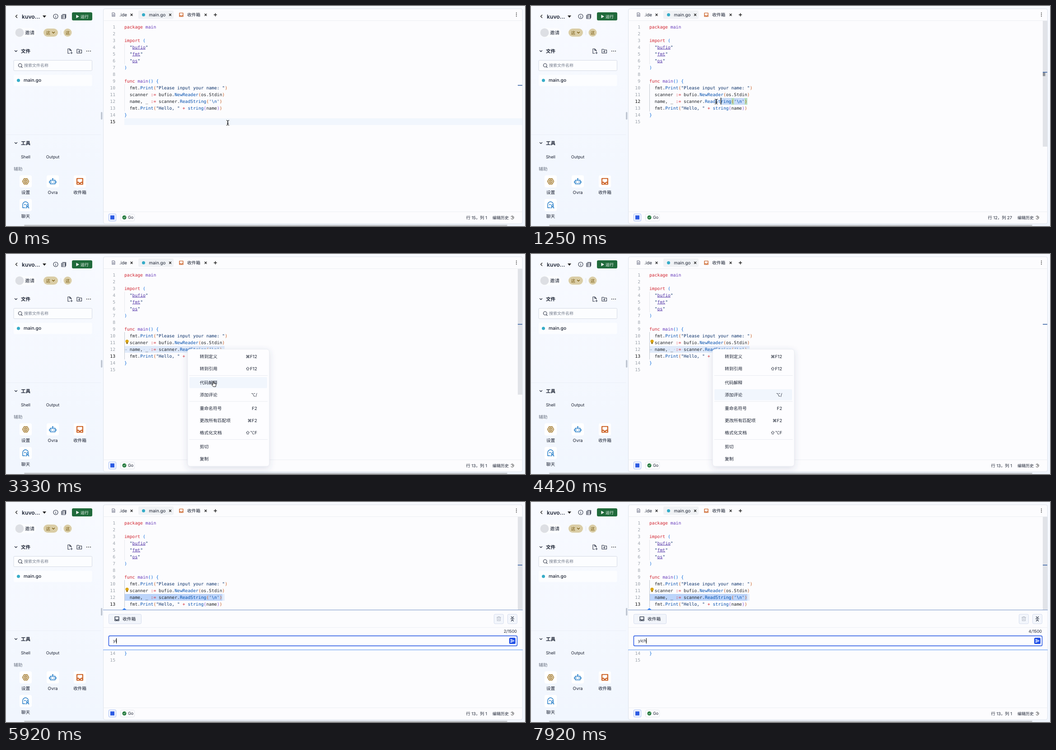
Write an HTML page that moves like this. It is 1149 px wide and 488 px high and loops after 8000 ms.

```html
<!DOCTYPE html>
<html lang="zh">
<head>
<meta charset="utf-8">
<title>Code editor</title>
<style>
  html, body { margin: 0; width: 100%; height: 100%; overflow: hidden; background: #f6f9fe; }
  svg { display: block; width: 1149px; height: 488px; }
  text { font: 9.75px Inter, "Noto Sans CJK SC", "Noto Sans CJK", "DejaVu Sans", sans-serif; fill: #1c2333;
         white-space: pre; text-rendering: geometricPrecision; }
  .code { font: 9.73px "DejaVu Sans Mono", monospace; fill: #1f2328; }
  .num { font: 9.73px "DejaVu Sans Mono", monospace; fill: #9ba2ab; text-anchor: end; }
  .num.on { fill: #111; }
  .red { fill: #d1242f; } .purple { fill: #6639ba; } .blue { fill: #0550ae; } .navy { fill: #0a3069; }
  .level1 { fill: #0969da; } .level2 { fill: #c4571a; } .level3 { fill: #8250df; }
  .link { fill: #5437a8; text-decoration: underline; text-underline-offset: 2px; }
  .space { fill: #a9b7cb; }
  .mid { text-anchor: middle; } .end { text-anchor: end; }
  .line { fill: none; stroke: #2a3142; stroke-width: 1.1; stroke-linecap: round; stroke-linejoin: round; }
</style>
</head>
<body>
<svg id="stage" viewBox="0 0 1149 488"></svg>
<script>
const CHAR = 5.86, LEFT = 262, ROW = 15, INDENT = LEFT + 2 * CHAR, PANEL_SHIFT = 94;
const rowY = n => 46 + ROW * (n - 1);
const colX = col => col < 2 ? LEFT : INDENT + (col - 2) * CHAR;

// Markup helpers
const text = (x, y, s, cls = '', extra = '') => `<text x="${x}" y="${y}" class="${cls}" ${extra}>${s}</text>`;
const box = (x, y, w, h, fill, r = 0, extra = '') =>
  `<rect x="${x}" y="${y}" width="${w}" height="${h}" rx="${r}" fill="${fill}" ${extra}/>`;
const line = (d, color = '#2a3142', width = 1.1, extra = '') =>
  `<path class="line" d="${d}" style="stroke:${color};stroke-width:${width}" ${extra}/>`;
const dot = (x, y, r, fill) => `<circle cx="${x}" cy="${y}" r="${r}" fill="${fill}"/>`;
const group = (id, content) => `<g id="${id}">${content}</g>`;
const cross = (x, y) => line(`M${x - 2} ${y - 2}l4 4m0-4l-4 4`, '#222', 1.3);
const chevron = (x, y, color) => line(`M${x - 2.5} ${y - 1.2}l2.5 2.5 2.5-2.5`, color, 1.3);
const tray = (x, y, color, s = 1) =>
  line('M-4-4h8v8h-8zM-4 1.3h2.3l.8 1.2h1.8l.8-1.2H4', color, 1.2, `transform="translate(${x} ${y}) scale(${s})"`);
const span = cls => s => `<tspan class="${cls}">${s}</tspan>`;
const [red, purple, blue, navy, link, b1, b2, b3] =
  ['red', 'purple', 'blue', 'navy', 'link', 'level1', 'level2', 'level3'].map(span);

const importLine = name => '\t' + navy('"') + link(name) + navy('"');
const code = [
  red('package') + ' ' + purple('main'), '',
  red('import') + ' ' + b1('('), importLine('bufio'), importLine('fmt'), importLine('os'), b1(')'), '',
  red('func') + ' ' + purple('main') + b1('()') + ' ' + b1('{'),
  '\tfmt.' + blue('Print') + b2('(') + navy('"Please input your name: "') + b2(')'),
  '\tscanner ' + red(':=') + ' bufio.' + blue('NewReader') + b2('(') + 'os.Stdin' + b2(')'),
  '\tname, _ ' + red(':=') + ' scanner.' + blue('ReadString') + b2('(') + navy("'" + blue('\\n') + "'") + b2(')'),
  '\tfmt.' + blue('Print') + b2('(') + navy('"Hello, "') + ' ' + red('+') + ' ' + blue('string') + b3('(') + 'name' + b3(')') + b2(')'),
  b1('}'), ''
];
const codeRow = (s, i) =>
  text(242, rowY(i + 1) + 3.5, i + 1, 'num', `id="num${i + 1}"`) +
  text(s[0] === '\t' ? INDENT : LEFT, rowY(i + 1) + 3.5, s.trim(), 'code');

const header = (y, s) => chevron(22, y) + text(33, y + 4, s, '', 'style="font-size:10.6px;font-weight:600"');
const tool = (x, y, label, icon) => box(x - 13.5, y - 13.5, 27, 27, '#fff', 4) +
  `<g transform="translate(${x} ${y})">${icon}</g>` + text(x, y + 28, label, 'mid');

const sidebar =
  line('M24.5 20l-3 3 3 3', '#222', 1.4) + text(35, 27.5, 'kuvo...', '', 'style="font-size:12.2px;font-weight:600"') +
  '<path d="M81 21h8l-4 5z" fill="#222"/>' +
  line('M115 23a5 5 0 1 1-10 0a5 5 0 1 1 10 0M110 22.5v3M110 20.5v.1') +
  line('M125 18.5h7.5v7.5M123 20.5h8.5v7.5h-8.5zM123 24.2h8.5M125 22.4h1M125 26.1h1') +
  box(146, 14, 45, 18, '#206a3b', 3) + '<path d="M155.5 19.5v7.5l6.5-3.75z" fill="#fff"/>' +
  text(165, 26.8, '运行', '', 'style="fill:#fff;font-size:9px"') +
  box(20, 48.5, 47, 21, '#fcfdff', 10.5) + dot(30, 59, 9.5, '#dddfe4') +
  text(42, 63, '邀请', '', 'style="font-size:10.6px"') +
  box(83, 50, 32, 18, '#dacda6', 9) + text(88.5, 62.6, '这', '', 'style="fill:#75570d;font-size:9.5px"') +
  chevron(105, 59, '#75570d') + line('M121.5 54v10', '#e0e4ec', 1) +
  dot(136.5, 59, 9, '#dacda6') + text(136.5, 62.6, '这', 'mid', 'style="fill:#75570d;font-size:9.5px"') +
  header(100, '文件') +
  line('M141 95h-4v10h4M141 95l3.5 3.5v2M141 95v3.5h3.5M145 102v4M143 104h4') +
  line('M157 96h4l1 1.5h5.5v7h-10.5zM162.2 99v4M160.2 101h4') +
  [179, 183, 187].map(x => dot(x, 100, 0.9, '#222')).join('') +
  box(17, 120.5, 173.5, 23, '#fcfdff', 2, 'stroke="#d5dbe5"') +
  line('M35 131.5a3.8 3.8 0 1 1-7.6 0a3.8 3.8 0 1 1 7.6 0M34 134.5l2 2') +
  text(40, 135.3, '搜索文件名称', '', 'style="fill:#747c8b;font-size:9px"') +
  box(17, 152.5, 173.5, 25, '#fcfdff', 3) + dot(27.5, 165, 3.5, '#35acc8') +
  text(39, 168.3, 'main.go', '', 'style="font-size:10.2px;font-weight:500"') +
  line('M0 285.5h210', '#eaeff7', 1) + box(210, 235, 3.4, 17, '#bfc6d2', 1.7) +
  header(304, '工具') + text(43.5, 338, 'Shell', 'mid', 'style="font-size:9.2px"') +
  text(103.5, 338, 'Output', 'mid', 'style="font-size:9.2px"') +
  text(17, 364.8, '辅助', '', 'style="fill:#6c7483"') +
  tool(43.5, 389, '设置', line('M-7 0l3.5-6h7l3.5 6-3.5 6h-7zM-3.8 0l1.9-3.3h3.8l1.9 3.3-1.9 3.3h-3.8z', '#95650b', 1.4) + dot(0, 0, 1.4, '#95650b')) +
  tool(103.5, 389, 'Ovra', line('M-5.5-2.5h11v8h-11zM0-2.5v-3M-1-6h2M-7.5 0v3M7.5 0v3M-2.4 1v1M2.4 1v1', '#1976c5', 1.4)) +
  tool(163.5, 389, '收件箱', tray(0, 0, '#c64f0b', 1.6)) +
  tool(43.5, 441.5, '聊天', line('M-1.5 6h-5v-6.500a6.200 6.200 0 0 1 12.400-1M-3-1h3M1 7q0-3 3-3t3 3M6 1.500a2 2 0 1 1-4 0a2 2 0 1 1 4 0', '#1976c5', 1.4));

const tabs =
  box(293, 10, 78, 18.500, '#f0f2f5', 3) + line('M235 15h4l2 2v6h-6zM236.500 19h3M236.500 21h3', '#6c7085') +
  text(251, 22.7, '.ide') + cross(278, 19.5) + dot(304.5, 19.500, 3.500, '#35acc8') +
  text(316.500, 22.7, 'main.go') + cross(363.500, 19.5) + tray(388, 19.5, '#c64f0b') +
  text(401, 23, '收件箱') + cross(442, 19.5) + line('M460.500 19.500h6M463.500 16.500v6', '#222', 1.5) +
  [15.5, 19, 22.5].map(y => dot(1130, y, 0.9, '#222')).join('') + line('M216 32.500h927', '#eceff3', 1);

const statusBar = line('M216 456.500h927', '#eceff3', 1) +
  box(227.5, 461, 16, 16, '#f1f5ff', 2, 'stroke="#a9bff5"') + box(231, 464.5, 9, 9, '#2d5be3') +
  box(253.500, 461.500, 31, 15.500, '#fcfcfe', 3, 'stroke="#e4e7ed"') + dot(262, 469, 4.5, '#247a3d') +
  line('M260 469l1.500 1.500 2.500-3', '#fff', 1) + text(270, 472.4, 'Go', '', 'style="font-size:9px"') +
  text(1065, 472.6, '', 'end', 'id="position" style="font-size:9.3px"') +
  text(1077, 472.6, '编辑历史', '', 'style="font-size:9px"') +
  line('M1118 467a3.500 3.500 0 1 1 0 4.500M1121 467.500v2h1.500', '#333', 1);

const menuItems = [[227, '转到定义', '⌘F12'], [254, '转到引用', '⇧F12'], [285, '代码解释', ''], [312, '添加评论', '⌥/'],
  [342, '重命名符号', 'F2'], [369, '更改所有匹配项', '⌘F2'], [396, '格式化文档', '⇧⌥F'], [427, '剪切', ''], [454, '复制', '']];
const menu = box(402, 211, 181, 260, '#fdfdff', 6, 'stroke="#e6e9ef" filter="url(#shadow)"') +
  box(406, 0, 172, 24.500, '#f1f6fd', 2, 'id="hover"') +
  [269.5, 327, 411.5].map(y => line(`M406 ${y}h173`, '#e9ecf1', 1)).join('') +
  menuItems.map(([y, label, keys]) => text(429, y + 3.500, label) + text(556, y + 3.500, keys, 'end')).join('');

const panel = box(215.500, 239.500, 928, 89, '#fcfcfe') +
  line('M215.500 239.500h928', '#6f8fc4', 1) + line('M215.500 328h928', '#4d8df0', 1.1) +
  '<path d="M257 239.500l5-4.500 5 4.500z" fill="#3f87f5"/>' +
  box(227.500, 249, 72, 21, '#f2f5fb', 2.500, 'stroke="#d5dced"') + tray(245.500, 259, '#222b3d', 1.100) + text(258, 262.700, '收件箱') +
  box(1080.500, 249, 21, 21, '#f3f6fc', 2.500, 'stroke="#d5dced"') +
  line('M1086.500 256h9M1089 256v-1.500h4v1.500M1087.500 256v7.500h7v-7.500M1090 258.500v3M1092 258.500v3', '#b3b9c5', 1) +
  box(1110.500, 249, 21, 21, '#f3f6fc', 2.500, 'stroke="#d5dced"') +
  line('M1118.500 254.500l2.500 2.500 2.500-2.500M1118.500 264l2.500-2.500 2.500 2.500M1117.500 259.200h7', '#222b3d', 1.200) +
  line('M216 278.500h927', '#eceff4', 1) + text(1131, 290.300, '', 'end', 'id="count" style="font-size:9px"') +
  box(226, 295.500, 907, 25, '#dce6fd', 3.500) + box(227.500, 297, 904, 22, '#fdfdff', 2.500, 'stroke="#2d5be3" stroke-width="1.400"') +
  text(237, 311.300, '', '', 'id="typed" style="font-size:9.3px"') + box(236.500, 302, 1.100, 12, '#111', 0, 'id="inputCaret"') +
  group('send', box(1114, 301, 14, 14, '#2453e8', 2.500) +
    line('M1117.500 304.500l7.500 3.500-7.500 3.500 1-3.500zM1118.500 308h3', '#fff', 1.100));

document.getElementById('stage').innerHTML = `
  <defs>
    <linearGradient id="sky" x2="0" y2="1"><stop stop-color="#f8faff"/><stop offset="1" stop-color="#f1f6fe"/></linearGradient>
    <linearGradient id="floor" x2="0" y2="1"><stop stop-color="#999" stop-opacity="0"/><stop offset="1" stop-color="#999" stop-opacity=".75"/></linearGradient>
    <filter id="shadow" x="-20%" y="-20%" width="140%" height="140%">
      <feDropShadow dx="0" dy="4" stdDeviation="7" flood-color="#42507a" flood-opacity=".16"/></filter>
  </defs>` +
  box(0, 0, 1149, 488, 'url(#sky)') + sidebar +
  box(215.500, 6, 928, 477, '#fcfcfe', 4, 'stroke="#dde3ec"') + box(40, 484, 1070, 4, 'url(#floor)', 2) + tabs +
  box(LEFT, 0, 881, ROW, '#f1f6fd', 0, 'id="activeLine"') +
  box(0, rowY(12) - 7, 0, ROW, '#c9dcf8', 0, 'id="selection"') +
  box(478.900, rowY(12) - 7, 5, ROW, '#dfeafc', 0, 'id="selectionTail"') +
  group('brackets', [443.700, 473].map(x => box(x, rowY(12) - 7, CHAR, ROW, '#b5e2c0')).join('')) +
  line('M262.500 84v45', '#e6e9ed', 1) + line('M262.500 173.500v60', '#e6e9ed', 1, 'id="guide"') +
  group('whitespace', text(LEFT, rowY(12) + 3.500, '→      · ·  ·', 'code space')) +
  code.slice(0, 13).map(codeRow).join('') +
  group('tail', code.slice(13).map((s, i) => codeRow(s, i + 13)).join('')) +
  group('bulb', dot(268, 193.500, 3.600, '#dba514') + box(266.300, 196, 3.400, 3.500, '#8f6b0c', 1)) +
  box(0, 0, 1.500, ROW, '#111', 0, 'id="caret"') +
  box(1133, 33, 10, 279, '#e1e3e8', 0, 'id="slider"') + box(1133, 147, 5.500, 8.500, '#8d9096', 0, 'id="matchMark"') +
  box(1133, 0, 10, 1.800, '#4f74ae', 0, 'id="lineMark"') +
  statusBar + group('panel', panel) + group('menu', menu) +
  group('beam', line('M-2.800-5.500q2.800 0 2.800 2v7q0 2-2.800 2M2.800-5.500q-2.800 0-2.800 2v7q0 2 2.800 2M-1.300 1.500h2.600', '#111', 1)) +
  group('hand', '<path d="M-2-5q1.500-.8 2 .8v3.200l4 .8q1.300.5 1 2.500l-.8 4h-5.200l-3.500-4q-.6-1.800 1.500-1l1 .8z" fill="#fff" stroke="#111"/>');

const ui = id => document.getElementById(id);
const show = (id, opacity) => ui(id).setAttribute('opacity', +opacity);
const set = (id, attrs) => Object.entries(attrs).forEach(([key, value]) => ui(id).setAttribute(key, value));
const clamp = (v, lo = 0, hi = 1) => Math.min(hi, Math.max(lo, v));

// All times below are in ticks, twelve per second.
const SELECT = 20, MENU = 36, CLOSE = 54, PANEL = 55;
const pointerPath = [[0, 491, 259], [9, 533, 214], [12, 533, 214], [15, 410, 212], [17, 258, 212], [19, 258, 212],
  [26, 403, 210], [35, 403, 210], [40, 460, 288], [45, 461, 290], [50, 462, 314], [96, 462, 314]];
const typing = [[PANEL, ''], [70, 'y'], [71, 'yi'], [77, 'y'], [79, ''], [83, 'yi'],
  [86, 'yic'], [87, 'yich'], [88, 'yicha'], [89, 'yichan'], [92, 'yichang'], [95, 'yich']];

function pointerAt(k) {
  const i = pointerPath.findIndex(p => p[0] > k);
  const [k0, x0, y0] = pointerPath[i - 1], [k1, x1, y1] = pointerPath[i];
  const u = (k - k0) / (k1 - k0);
  return [x0 + (x1 - x0) * u, y0 + (y1 - y0) * u];
}

function draw(k) {
  const [px, py] = pointerAt(k);
  const menuOpen = k >= MENU && k < CLOSE, panelOpen = k >= PANEL;
  const dragging = k >= 13 && k < SELECT, selected = k >= SELECT;
  const row = k < 9 ? 15 : selected ? 13 : 12;

  let col = 1;
  if (row === 12) col = !dragging ? 37 : px < 262 ? 1 : clamp(Math.round((px + 10 - INDENT) / CHAR) + 2, 1, 37);
  const blink = selected ? (k - SELECT) % 12 < 6 : k >= 9;
  set('caret', { x: colX(col) - 0.5, y: rowY(row) - 7.5 });
  show('caret', blink && k < MENU);
  ui('position').textContent = `行 ${row}，列 ${col}`;
  for (let n = 1; n <= 15; n++) ui('num' + n).classList.toggle('on', n === row);

  const from = selected ? LEFT : colX(col);
  set('selection', { x: from, width: Math.max(0, 478.9 - from),
    fill: panelOpen ? '#bcd4fa' : menuOpen ? '#e0eafa' : selected ? '#cddff5' : '#c9dcf8' });
  show('selection', dragging || selected);
  set('selectionTail', { fill: panelOpen ? '#e3edfc' : menuOpen ? '#e0eafa' : '#cddff5' });
  show('selectionTail', selected);
  set('activeLine', { y: rowY(row) - 7 });
  show('activeLine', k < 13);
  show('brackets', k >= 9 && k < 16);
  show('matchMark', k >= 9 && k < 16);
  show('whitespace', selected && !panelOpen);
  show('bulb', k >= SELECT + 2);
  ui('guide').style.stroke = row === 15 ? '#e6e9ed' : '#c3c8cf';

  const fade = k < MENU ? clamp(k / 2) : k < CLOSE ? 1 - clamp((k - 42) / 9) : clamp((k - 53) / 2);
  show('slider', fade);
  set('slider', { height: panelOpen ? 206 : 279 });
  set('lineMark', { y: panelOpen ? 139 : { 12: 146, 13: 155, 15: 175 }[row] });

  show('menu', menuOpen);
  const hoverRow = k < 38 ? 227 : k < 39 ? 254 : k < 47 ? 285 : 312;
  set('hover', { y: hoverRow - 12 });

  show('panel', panelOpen);
  set('tail', { transform: `translate(0 ${panelOpen ? PANEL_SHIFT : 0})` });
  const [since, word] = typing.filter(e => e[0] <= k).pop() || typing[0];
  ui('typed').textContent = word;
  ui('count').textContent = `${word.length}/1500`;
  set('inputCaret', { x: 236.5 + ui('typed').getComputedTextLength() });
  show('inputCaret', (k - since) % 12 < 6);
  show('send', word ? 1 : 0.4);

  const hand = k > MENU;
  set(hand ? 'hand' : 'beam', { transform: `translate(${px} ${py})` });
  show('beam', !hand);
  show('hand', hand && k < 53);
}

const start = performance.now();
function loop() {
  const time = (performance.now() - start) % 8000;
  draw(Math.floor((time + 4) * 12 / 1000) % 96);
  requestAnimationFrame(loop);
}
loop();
</script>
</body>
</html>
```
